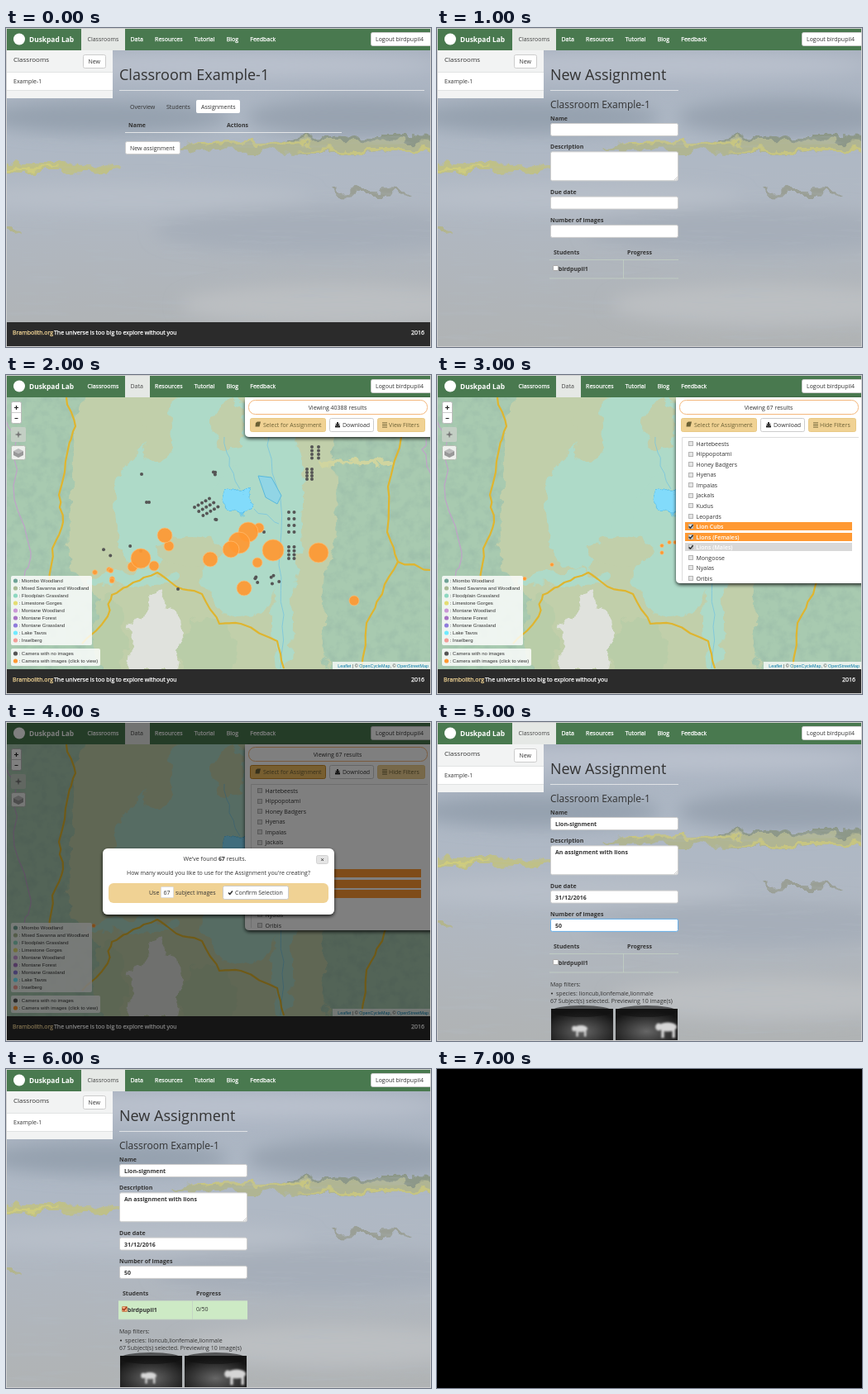
An HTML page that plays this animation: 514 px wide and 386 px high, repeating every 8 s.

```html
<!DOCTYPE html>
<html lang="en">
<head>
<meta charset="utf-8">
<title>Classroom assignment walkthrough</title>
<style>
  html, body { margin: 0; width: 100%; height: 100%; overflow: hidden; background: #000; }
  svg { display: block; width: 100vw; height: 100vh; }
  text { font-family: "Open Sans", sans-serif; white-space: pre; }
  .map-text { font-family: "Liberation Sans", Arial, sans-serif; }
</style>
</head>
<body>
<svg id="stage" viewBox="0 0 514 386"></svg>
<script>
const INK = '#333', TAN = '#f0d294', OLIVE = '#6c6135', ORANGE = '#ff9933';

// Drawing helpers: each returns SVG markup
const text = (x, y, str, size = 7, fill = INK, more = '') =>
  `<text x="${x}" y="${y}" font-size="${size}" fill="${fill}" ${more}>${str}</text>`;
const bold = (x, y, str, size = 7, fill = INK) => text(x, y, str, size, fill, 'font-weight="700"');
const onDark = (x, y, str, fill = '#fff') => text(x, y, str, 7, fill, `stroke="${fill}" stroke-width=".25"`);
const centered = (x, y, str) => text(x, y, str, 7, INK, 'text-anchor="middle"');
const rect = (x, y, w, h, fill, more = '') =>
  `<rect x="${x}" y="${y}" width="${w}" height="${h}" fill="${fill}" ${more}/>`;
const box = (x, y, w, h, fill = '#fff', stroke = '#ccc', r = 2) =>
  rect(x + .5, y + .5, w - 1, h - 1, fill, `stroke="${stroke}" rx="${r}"`);
const dot = (x, y, r, fill, more = '') => `<circle cx="${x}" cy="${y}" r="${r}" fill="${fill}" ${more}/>`;
const oval = (x, y, rx, ry, fill, more = '') =>
  `<ellipse cx="${x}" cy="${y}" rx="${rx}" ry="${ry}" fill="${fill}" ${more}/>`;
const path = (d, fill, more = '') => `<path d="${d}" fill="${fill}" ${more}/>`;
const line = (d, stroke, width = 1, more = '') =>
  path(d, 'none', `stroke="${stroke}" stroke-width="${width}" stroke-linejoin="round" ${more}`);
const tick = (x, y, color = INK) => line(`M${x} ${y}l1.7 2 3.2-4`, color, 1.5);
const each = (items, draw) => items.map(draw).join('');
const group = (filter, content) => `<g filter="url(#${filter})">${content}</g>`;
const shifted = (dx, dy, content) => `<g transform="translate(${dx} ${dy})">${content}</g>`;

function seeded(seed) {
  return () => {
    seed = (seed * 16807) % 2147483647;
    return seed / 2147483647;
  };
}

// Polyline through a few key points with small seeded bends between them
function trail(points, wobble = 4) {
  const random = seeded(points.length * 991), steps = 4;
  const bend = i => i % steps ? (random() - .5) * wobble : 0;
  const route = Array.from({ length: (points.length - 1) * steps + 1 }, (_, i) => {
    const k = Math.floor(i / steps), t = i / steps - k;
    const [x0, y0] = points[k], [x1, y1] = points[k + 1] || points[k];
    return `${(x0 + (x1 - x0) * t + bend(i)).toFixed(1)} ${(y0 + (y1 - y0) * t + bend(i)).toFixed(1)}`;
  });
  return 'M' + route.join('L');
}

const photo = () => `<g id="photo">
  ${rect(0, 0, 514, 386, 'url(#scene)')}
  ${group('soft', oval(260, 45, 270, 16, '#bac1cd') + oval(120, 108, 150, 20, '#95a1af')
    + oval(430, 108, 140, 24, '#98a3b0') + oval(150, 205, 220, 16, '#b8bfc9')
    + oval(380, 245, 200, 28, '#a6aeb9') + oval(400, 335, 190, 25, '#bcbfc2'))}
  ${group('ragged', oval(460, 136, 120, 5, '#8d9889') + oval(390, 143, 190, 7, '#b0b593')
    + oval(300, 139, 75, 2, '#c7c581') + oval(445, 147, 95, 2, '#c7c581')
    + oval(45, 170, 95, 6, '#bfc088') + oval(20, 171, 50, 2, '#cfcc7d')
    + oval(440, 199, 50, 3, '#9a9f96') + oval(4, 244, 10, 3, '#b3b58d'))}
  ${rect(0, 155, 514, 231, '#fff', 'filter="url(#ripple)"')}
</g>`;

const GREEN = '#a8cab0', SAVANNA = '#c1cfaa', FLOODPLAIN = '#aedac8';
const ROAD = '#dfb52f', CORDON = '#bfa3c8', RIVER = '#78c4df';
const ROADS = [
  [[73, 27], [84, 62], [75, 90], [64, 145], [69, 178], [56, 210], [53, 250]],
  [[92, 325], [123, 292], [128, 266], [154, 251], [183, 239], [206, 256], [237, 265], [258, 301], [284, 301],
    [328, 322], [336, 355]],
  [[473, 27], [478, 75], [462, 135], [461, 190], [474, 226], [455, 265], [436, 300], [430, 355]],
  [[474, 226], [513, 236]],
];
const CORDONS = [[[0, 45], [12, 80], [10, 150], [30, 215], [22, 245]], [[514, 60], [503, 90], [514, 120]]];
const RIVERS = [[[320, 27], [316, 85], [332, 150], [330, 230], [336, 290], [332, 355]], [[300, 162], [330, 180]],
  [[283, 138], [270, 110], [264, 75]]];

const terrain = () => `<g id="terrain">
  ${rect(0, 26, 514, 331, GREEN)}
  ${rect(0, 26, 514, 331, '#000', 'filter="url(#hills)"')}
  ${group('ragged', path('M92 20Q72 160 78 235L120 275 115 360H390Q375 300 392 230T388 20Z', SAVANNA)
    + oval(240, 120, 82, 100, FLOODPLAIN) + oval(172, 165, 42, 72, FLOODPLAIN)
    + oval(285, 205, 52, 92, FLOODPLAIN) + oval(155, 246, 55, 9, FLOODPLAIN)
    + oval(335, 150, 24, 125, FLOODPLAIN) + oval(334, 300, 11, 65, FLOODPLAIN)
    + oval(183, 66, 19, 42, SAVANNA) + oval(270, 62, 20, 28, SAVANNA) + oval(222, 213, 38, 20, SAVANNA)
    + oval(125, 315, 18, 50, '#b9cda8') + oval(245, 335, 34, 42, '#b9cda8')
    + path('M145 358L150 308 183 263 206 292 213 324 207 358Z', '#e0e2dd'))}
  ${group('ragged', line('M380 106L410 110 466 105M420 109V100M440 107L446 115', '#d0d59f', 5))}
  ${each(CORDONS, route => line(trail(route, 6), CORDON, 1.2))}
  ${each(RIVERS, route => line(trail(route, 5), RIVER, .8))}
  ${group('ragged', oval(281, 153, 18, 14, '#82dbfb', 'stroke="#59bfe9"'))}
  ${path('M305 122L321 124 333 146 328 156 314 148Z', '#91d5e5', 'stroke="#59b9dd"')}
  ${each(ROADS, route => line(trail(route), ROAD, 2.2))}
</g>`;

const defs = `<defs>
  <linearGradient id="scene" x2="0" y2="1">
    <stop offset=".07" stop-color="#a8b1bf"/><stop offset=".3" stop-color="#aeb8c5"/>
    <stop offset=".55" stop-color="#b0b8c3"/><stop offset="1" stop-color="#b0b3b4"/>
  </linearGradient>
  <radialGradient id="night" cy=".7" r=".65">
    <stop stop-color="#666"/><stop offset=".55" stop-color="#383838"/><stop offset="1" stop-color="#151515"/>
  </radialGradient>
  <filter id="soft"><feGaussianBlur stdDeviation="10"/></filter>
  <filter id="edge"><feGaussianBlur stdDeviation="1.2"/></filter>
  <filter id="ragged" x="-20%" y="-50%" width="140%" height="200%" color-interpolation-filters="sRGB">
    <feTurbulence type="fractalNoise" baseFrequency=".05" numOctaves="3" seed="6"/>
    <feDisplacementMap in="SourceGraphic" scale="22" xChannelSelector="R" yChannelSelector="G"/>
  </filter>
  <filter id="shadow" x="-10%" y="-10%" width="120%" height="125%">
    <feDropShadow dx="0" dy="2" stdDeviation="2" flood-opacity=".8"/>
  </filter>
  <filter id="ripple"><feTurbulence baseFrequency=".012 .14" numOctaves="3" seed="4"/>
    <feColorMatrix values="0 0 0 0 .45 0 0 0 0 .5 0 0 0 0 .56 .7 0 0 0 -.25"/></filter>
  <filter id="hills"><feTurbulence type="fractalNoise" baseFrequency=".08" numOctaves="4" seed="8"/>
    <feColorMatrix values="0 0 0 0 .25 0 0 0 0 .4 0 0 0 0 .35 .7 0 0 0 -.28"/></filter>
  <clipPath id="list"><rect x="296" y="75" width="214" height="174"/></clipPath>
  ${photo()}${terrain()}
</defs>`;

const TABS = ['Classrooms', 'Data', 'Resources', 'Tutorial', 'Blog', 'Feedback'];

function navBar(active) {
  const tab = (name, i) => {
    const fill = i === active ? '#444' : '#fff';
    return `<tspan dx="${i ? 14.2 : 0}" fill="${fill}" stroke="${fill}" stroke-width="${i === active ? 0 : .25}">${name}</tspan>`;
  };
  return rect(0, 0, 514, 27, '#49794f') + dot(16, 13.5, 7, '#fff') + bold(28, 17, 'Duskpad Lab', 8.4, '#fff')
    + (active ? rect(144, 1, 30, 26, '#e5e8e5') : rect(91, 1, 53, 26, '#e5e8e5'))
    + text(98.5, 16, each(TABS, tab))
    + box(441, 5, 74, 17) + text(447, 16, 'Logout birdpupil4');
}

const footer = () => rect(0, 356, 514, 30, '#2b2b2b') + onDark(8, 371, 'Brambolith.org', '#f0d394')
  + onDark(58, 371, 'The universe is too big to explore without you') + onDark(490, 371, '2016');

const classroomPage = content => '<use href="#photo"/>' + navBar(0)
  + rect(0, 27, 129, 58, '#f2f3f3') + rect(0, 54, 129, 21, '#fff')
  + line('M0 53.5H129M0 75.5H129', '#e1e3e3')
  + text(9, 41, 'Classrooms', 8) + box(93, 32, 28, 17) + text(99.5, 43, 'New') + text(9, 67, 'Example-1')
  + content;

const assignmentList = () => classroomPage(
  text(137, 63, 'Classroom Example-1', 18) + line('M137 75.5H506', '#dfe2e5')
  + text(150, 98, 'Overview') + text(194, 98, 'Students')
  + rect(230, 87, 53, 16, '#fff', 'rx="2"') + text(236, 98, 'Assignments')
  + bold(148, 120, 'Name') + bold(267, 120, 'Actions') + line('M144 126.5H406', '#e3e5e7')
  + box(144, 137, 67, 16) + text(150, 148, 'New assignment') + footer());

const animal = (x, y, size) => group('edge', oval(x, y, size, size * .5, '#d6d6d6')
  + oval(x - size, y, size * .35, size * .4, '#d6d6d6')
  + rect(x - size * .7, y, size * .3, size * 1.2, '#d6d6d6') + rect(x + size * .5, y, size * .3, size * 1.2, '#d6d6d6'));
const nightShot = x => rect(x, 347, 75, 39, 'url(#night)') + oval(x + 37, 350, 37, 7, '#111', 'opacity=".6"');

const mapFilters = () => text(137, 320, 'Map filters:') + dot(139, 328.5, 1.1, INK)
  + text(144, 331, 'species: lioncub,lionfemale,lionmale')
  + text(137, 340, '67 Subject(s) selected. Previewing 10 image(s)')
  + nightShot(138) + animal(174, 371, 8) + nightShot(216) + animal(279, 369, 11);

const FIELDS = [['Name', 'Lion-signment', 16], ['Description', 'An assignment with lions', 36],
  ['Due date', '31/12/2016', 16], ['Number of images', '50', 16]];

function assignmentForm({ filled = false, focused = false, checked = false }) {
  let top = 115;
  const field = ([label, value, height], i) => {
    const border = focused && i === FIELDS.length - 1 ? '#66afe9' : '#ccc';
    const markup = bold(137, top - 3, label) + box(137, top, 155, height, '#fff', border)
      + (filled ? bold(143, top + 11, value) : '');
    top += height + 18.3;
    return markup;
  };
  return classroomPage(
    text(137, 63, 'New Assignment', 18) + line('M137 75.5H292', '#dfe2e5')
    + text(137, 97, 'Classroom Example-1', 12) + each(FIELDS, field)
    + line('M287 184l4-4M289 184l2-2', '#999', .5)
    + bold(141, 274, 'Students') + bold(230, 274, 'Progress')
    + (checked ? rect(136, 280, 156, 23, '#cdeac5') : '')
    + line('M136 280.5H292M136 303H292M225.5 280V303', '#c3d1c5', .8)
    + box(140, 287, 7, 7, checked ? '#f5b184' : '#fff', checked ? '#c58555' : '#aaa', .5)
    + (checked ? tick(141, 290, '#a33b20') + text(230, 293, '0/50') : '')
    + bold(147, 294, 'birdpupil1') + (filled ? mapFilters() : ''));
}

const HABITATS = [['Miombo Woodland', '#6fa396'], ['Mixed Savanna and Woodland', '#a9ba94'],
  ['Floodplain Grassland', '#8dd8c0'], ['Limestone Gorges', '#e4dd72'], ['Montane Woodland', '#ca98d6'],
  ['Montane Forest', '#a672c4'], ['Montane Grassland', '#8e7cdb'], ['Lake Tavos', '#6feaff'], ['Inselberg', '#f29d97']];
const CAMERAS = [['Camera with no images', '#555'], ['Camera with images (click to view)', ORANGE]];

const legend = (items, top, width) => rect(6, top, width, items.length * 9 + 3, '#fff', 'rx="2" opacity=".82"')
  + each(items, ([name, color], i) => dot(11.5, top + 6 + i * 9, 2.6, color)
    + text(15.5, top + 8 + i * 9, ': ' + name, 6, INK, 'class="map-text"'));

const mapControls = () => shifted(0, 1, box(6, 31, 13, 27, '#fff', '#bbb') + line('M7 44.5H18', '#ccc')
  + line('M10 38.5h5M12.5 36v5M10.5 51.5h4', '#222', 1.2)
  + rect(6, 62, 18, 18, '#c3cfc4', 'rx="2"') + line('M15 67.5v7M11.5 71h7', '#666') + dot(15, 71, 1.8, '#777')
  + box(6, 84, 18, 18, '#eef0ed', '#b6beb4')
  + path('M15 88l6 3-6 3-6-3Z', '#bbb') + path('M9 91l6 3v5l-6-3ZM21 91l-6 3v5l6-3Z', '#999'));

const link = '<tspan fill="#0078a8">';
const attribution = () => rect(395, 347, 118, 9, '#fff', 'opacity=".75"')
  + text(511, 354, `${link}Leaflet</tspan> | © ${link}OpenCycleMap</tspan>, © ${link}OpenStreetMap</tspan>`,
    5.4, INK, 'class="map-text" text-anchor="end"');

const mapPage = (markers, panel) => '<use href="#terrain"/>' + markers + mapControls()
  + legend(HABITATS, 243, 98) + legend(CAMERAS, 331, 108) + attribution()
  + navBar(1) + panel + footer();

// Camera sites: a (slanted) grid or a loose scatter around a centre
const grid = (x, y, cols, rows, dx, dy, slant = 0) => Array.from({ length: cols * rows }, (_, i) => {
  const col = i % cols, row = Math.floor(i / cols);
  return [x + col * dx + row * slant * 2, y + row * dy - col * slant];
});
function scatter(x, y, rx, ry, count) {
  const random = seeded(x * 37 + y);
  return Array.from({ length: count }, () => [x + (random() * 2 - 1) * rx, y + (random() * 2 - 1) * ry]);
}

const LARGE_SITES = [[163, 222, 12], [293, 190, 12], [282, 203, 13], [323, 212, 13], [378, 215, 12],
  [192, 194, 9], [247, 223, 9], [288, 258, 9], [272, 211, 10]];
const SMALL_SITES = [[197, 207], [153, 232], [179, 231], [306, 185], [304, 227], [421, 273]];

function allCameras() {
  const empty = [grid(342, 166, 2, 4, 6.5, 8), grid(342, 208, 2, 4, 6.5, 4.7), grid(370, 87, 2, 4, 8, 4.5),
    grid(364, 114, 2, 4, 6, 4), grid(228, 160, 5, 3, 4.5, 5, 2.6), grid(170, 154, 2, 1, 3, 0),
    scatter(256, 118, 6, 4, 3), scatter(260, 175, 8, 2, 2), scatter(316, 247, 18, 6, 7),
    scatter(140, 213, 24, 8, 4), [[164, 120], [208, 259], [312, 190]]].flat();
  const tiny = scatter(126, 238, 20, 11, 5);
  const site = ([x, y, r]) => dot(x, y, r, ORANGE, 'opacity=".93" stroke="#ffbd70" stroke-width=".8"');
  return each(empty, ([x, y]) => dot(x, y, 2, '#555'))
    + each(tiny, ([x, y]) => site([x, y, 3])) + each(SMALL_SITES, ([x, y]) => site([x, y, 6])) + each(LARGE_SITES, site);
}

const lionCameras = () => each([[139, 229], [106, 246], ...grid(272, 206, 1, 2, 0, 8.5), ...grid(281, 202, 2, 1, 7, 0)],
  ([x, y]) => dot(x, y + .5, 2.2, ORANGE, 'stroke="#ffc27a" stroke-width=".6"'));

function resultsPanel(count, toggle, height, extra = '', pressed = false) {
  return rect(289, 27, 231, height, '#fff', 'rx="5" filter="url(#shadow)"') + rect(289, 27, 225, 10, '#fff')
    + box(293, 30, 217, 18, '#fff', '#f4b77c', 8) + centered(401, 42, `Viewing ${count} results`)
    + box(295, 52, 92, 17, pressed ? '#f0bd61' : TAN, pressed ? '#c98a25' : '#e9c985')
    + path('M302 58l2-1.5h4l-1.5 6h-5Z', OLIVE) + text(311, 63, 'Select for Assignment', 7, OLIVE)
    + box(391, 52, 54, 17) + path('M400 57h2v2h2l-3 3-3-3h2ZM398 61h6v2.5h-6Z', INK) + text(407, 63, 'Download')
    + box(449, 52, 58, 17, TAN, '#e9c985') + line('M455 58h6M455 60.5h6M455 63h6', OLIVE, 1.2)
    + text(463, 63, toggle + ' Filters', 7, OLIVE) + extra;
}

const SPECIES = ['Hartebeests', 'Hippopotami', 'Honey Badgers', 'Hyenas', 'Impalas', 'Jackals', 'Kudus', 'Leopards',
  'Lion Cubs', 'Lions (Females)', 'Lions (Males)', 'Mongoose', 'Nyalas', 'Oribis'];

function speciesList(hovered) {
  const row = (name, i) => {
    const y = 83 + i * 12.53, chosen = name.startsWith('Lion');
    return (chosen ? rect(300, Math.round(y - 5), 202, 10, i === hovered ? '#d8d8d8' : ORANGE) : '')
      + box(304, Math.round(y - 3), 6, 6, '#e4e4e4', '#b5b5b5', 0) + (chosen ? tick(304.7, y) : '')
      + text(313.5, Math.round(y + 2.8), name, 7, chosen ? '#fff' : INK, chosen ? 'font-weight="600"' : '');
  };
  return line('M296.5 249V75.5H510', '#ddd') + `<g clip-path="url(#list)">${each(SPECIES, row)}</g>`;
}

const fullMap = () => mapPage(allCameras(), resultsPanel(40388, 'View', 48));
const filteredMap = (hovered, pressed) =>
  mapPage(lionCameras(), resultsPanel(67, 'Hide', 225, speciesList(hovered), pressed));

const selectionDialog = () => filteredMap(-1, true) + rect(0, 0, 514, 386, '#000', 'opacity=".5"')
  + rect(117, 153, 280, 80, '#fff', 'rx="6" filter="url(#shadow)"')
  + centered(252.5, 168, 'We\'ve found <tspan font-weight="700">67</tspan> results.')
  + box(375, 161, 15, 11, '#e4e4e4', '#d2d2d2') + line('M381.3 165.3l2.6 2.6m0-2.6l-2.6 2.6', INK)
  + centered(257, 185, 'How many would you like to use for the Assignment you\'re creating?')
  + rect(124, 195, 266, 24, TAN, 'rx="6"') + text(173, 209, 'Use')
  + box(187, 199, 16, 14, '#fff', '#ddd', 1) + text(190.5, 209, '67') + text(205, 209, 'subject images')
  + box(262, 198, 80, 17) + tick(269, 206.5) + text(277, 209, 'Confirm Selection');

const border = rect(.5, .5, 513, 385, 'none', 'stroke="#cfcfcf"');
const scenes = [
  assignmentList() + border,
  assignmentForm({}) + border,
  fullMap() + border,
  filteredMap(10, false) + border,
  selectionDialog() + border,
  assignmentForm({ filled: true, focused: true }) + border,
  assignmentForm({ filled: true, checked: true }) + border,
  rect(0, 0, 514, 386, '#000'),
];

const stage = document.getElementById('stage');
stage.innerHTML = defs + each(scenes, scene => `<g class="scene" display="none">${scene}</g>`);
const groups = [...stage.querySelectorAll('.scene')];
const start = performance.now();
let shown = -1;

function render(now) {
  const current = Math.floor(Math.max(0, now - start) / 1000) % scenes.length;
  if (current !== shown) {
    groups.forEach((scene, i) => scene.setAttribute('display', i === current ? 'inline' : 'none'));
    shown = current;
  }
  requestAnimationFrame(render);
}
render(start);
</script>
</body>
</html>
```
